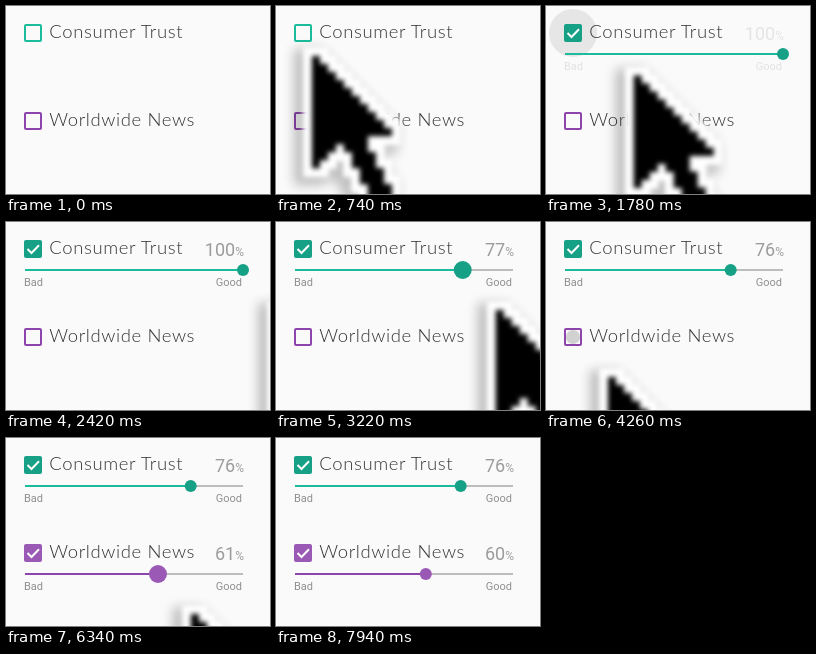
An HTML page that plays this animation: 264 by 188 pixels, repeating every 8000 ms.

```html
<!DOCTYPE html>
<html lang="en">
<head>
<meta charset="utf-8">
<title>Rating sliders</title>
<style>
  html, body { margin: 0; width: 100%; height: 100%; overflow: hidden; background: #fafafa; }
  svg { display: block; width: 264px; height: 188px; }
  .name { font: 300 18.5px Lato, sans-serif; letter-spacing: .6px; fill: #333; }
  .value { font: 18px Roboto, sans-serif; fill: #9c9c9c; text-anchor: end; }
  .unit { font-size: 12px; }
  .label { font: 11px Roboto, sans-serif; fill: #8f8f8f; }
</style>
</head>
<body>
<svg viewBox="0 0 264 188">
  <defs>
    <filter id="soft" x="-30%" y="-30%" width="160%" height="160%"><feGaussianBlur stdDeviation="2.4"/></filter>
    <filter id="shade" x="-50%" y="-50%" width="200%" height="200%"><feGaussianBlur stdDeviation="6"/></filter>
    <path id="arrow"/>
  </defs>
  <g id="rows"></g>
  <g id="cursor">
    <use href="#arrow" x="-6" y="5" stroke="#000" stroke-width="24" opacity=".24" filter="url(#shade)"/>
    <use href="#arrow" fill="#fff" stroke="#fff" stroke-width="18" filter="url(#soft)"/>
    <use href="#arrow" filter="url(#soft)"/>
  </g>
</svg>
<script>
const LOOP = 8000, START = 500, STEP = 80;
const LEFT = 19, SPAN = 218, CELL = 8;
const $ = id => document.getElementById(id);

const ramp = (t, from, length) => Math.min(1, Math.max(0, (t - from) / length));
const mix = (a, b, p) => a + (b - a) * p;
const smooth = p => p * p * (3 - 2 * p);
const slow = p => Math.sin(p * Math.PI / 2);
const overshoot = p => 1 + 4 * (p - 1) ** 3 + 3 * (p - 1) ** 2;

const rows = [
  {
    name: 'Consumer Trust', y: 0, edge: '#1abc9c', solid: '#16a085',
    click: 1460, grab: 2420, release: 3540,
    drags: [{ from: 2480, to: 3380, value: 76 }]
  },
  {
    name: 'Worldwide News', y: 88, edge: '#8e44ad', solid: '#9b59b6',
    click: 4260, grab: 5220, release: 7220,
    drags: [{ from: 5300, to: 6340, value: 61 }, { from: 6820, to: 6980, value: 60 }]
  }
];

const valueAt = (row, t) => row.drags.reduce(
  (v, d) => mix(v, d.value, slow(ramp(t, d.from, d.to - d.from))), 100);
const knobX = value => LEFT + SPAN * value / 100;

// Where the pointer tip rests for each control
const atBox = row => () => [62, row.y + 67];
const atKnob = row => t => [knobX(valueAt(row, t)) + 33, row.y + 88];

const moves = [
  { from: 500, to: 1220, spot: atBox(rows[0]), ease: overshoot },
  { from: 1600, to: 2420, spot: atKnob(rows[0]), ease: smooth },
  { from: 3540, to: 4100, spot: atBox(rows[1]), ease: smooth },
  { from: 4400, to: 5220, spot: atKnob(rows[1]), ease: smooth },
  { from: 7220, to: 7460, spot: () => [184, 230], ease: smooth }
];

const tipAt = t => moves.reduce((tip, m) => {
  const p = m.ease(ramp(t, m.from, m.to - m.from));
  return m.spot(t).map((end, i) => mix(tip[i], end, p));
}, [238, 182]);

// Pointer: a stepped triangle, a shrinking left foot and a slanted tail
function arrowPath() {
  const cell = (row, col, width) =>
    `M${col * CELL} ${row * CELL}h${width * CELL}v${CELL + .3}h${-width * CELL}z`;
  let d = '';
  for (let r = 0; r < 18; r++) {
    if (r < 10) d += cell(r, 0, r + 1);
    else d += cell(r, Math.floor(r / 2) - 1, 3);
    if (r >= 10 && r < 14) d += cell(r, 0, 14 - r);
  }
  return d;
}
$('arrow').setAttribute('d', arrowPath());

$('rows').innerHTML = rows.map(r => `
  <g transform="translate(0 ${r.y})">
    <circle data-part="ripple" cx="27" cy="27"/>
    <rect data-part="box" x="19" y="19" width="16" height="16" rx="1" stroke-width="2"/>
    <path data-part="tick" d="M21.5 27l4 4 7.5-7.7" fill="none" stroke="#fff" stroke-width="2"/>
    <text class="name" x="43.3" y="32">${r.name}</text>
    <g data-part="slider">
      <path d="M${LEFT} 48h${SPAN}" stroke="#bdbdbd" stroke-width="2"/>
      <path data-part="bar" stroke="${r.edge}" stroke-width="2"/>
      <circle data-part="knob" cy="48" fill="${r.solid}"/>
    </g>
    <g data-part="texts">
      <text class="value" x="238" y="34"><tspan data-part="number"></tspan><tspan class="unit">%</tspan></text>
      <text class="label" x="18" y="64">Bad</text>
      <text class="label" x="236" y="64" text-anchor="end">Good</text>
    </g>
  </g>`).join('');

rows.forEach((r, i) => {
  r.part = {};
  $('rows').children[i].querySelectorAll('[data-part]').forEach(el => r.part[el.dataset.part] = el);
});

function drawRow(r, t) {
  const since = t - r.click, checked = since >= 160;
  const set = (part, attrs) => {
    for (const key in attrs) r.part[part].setAttribute(key, attrs[key]);
  };
  const value = valueAt(r, t);
  const x = mix(LEFT, knobX(value), ramp(since, 80, 160));
  set('ripple', { r: 24 * ramp(since, -100, 340), opacity: .16 * (1 - ramp(since, 0, 640)) });
  set('box', { fill: checked ? r.solid : 'none', stroke: checked ? r.solid : r.edge });
  set('tick', { opacity: +checked });
  set('slider', { opacity: +(since >= 80) });
  set('bar', { d: `M${LEFT} 48H${x}` });
  set('knob', { cx: x, r: 6 + 3 * (ramp(t, r.grab, 160) - ramp(t, r.release, 160)) });
  set('texts', { opacity: ramp(since, 240, 360) });
  r.part.number.textContent = Math.round(value);
}

function draw(now) {
  const time = now % LOOP;
  const t = time < START ? 0 : START + Math.floor((time - START) / STEP) * STEP;
  rows.forEach(r => drawRow(r, t));
  $('cursor').setAttribute('transform', `translate(${tipAt(t)})`);
  $('cursor').setAttribute('visibility', t >= START && t < 7460 ? 'visible' : 'hidden');
}

const origin = performance.now();
function tick() {
  draw(performance.now() - origin);
  requestAnimationFrame(tick);
}
tick();
</script>
</body>
</html>
```
